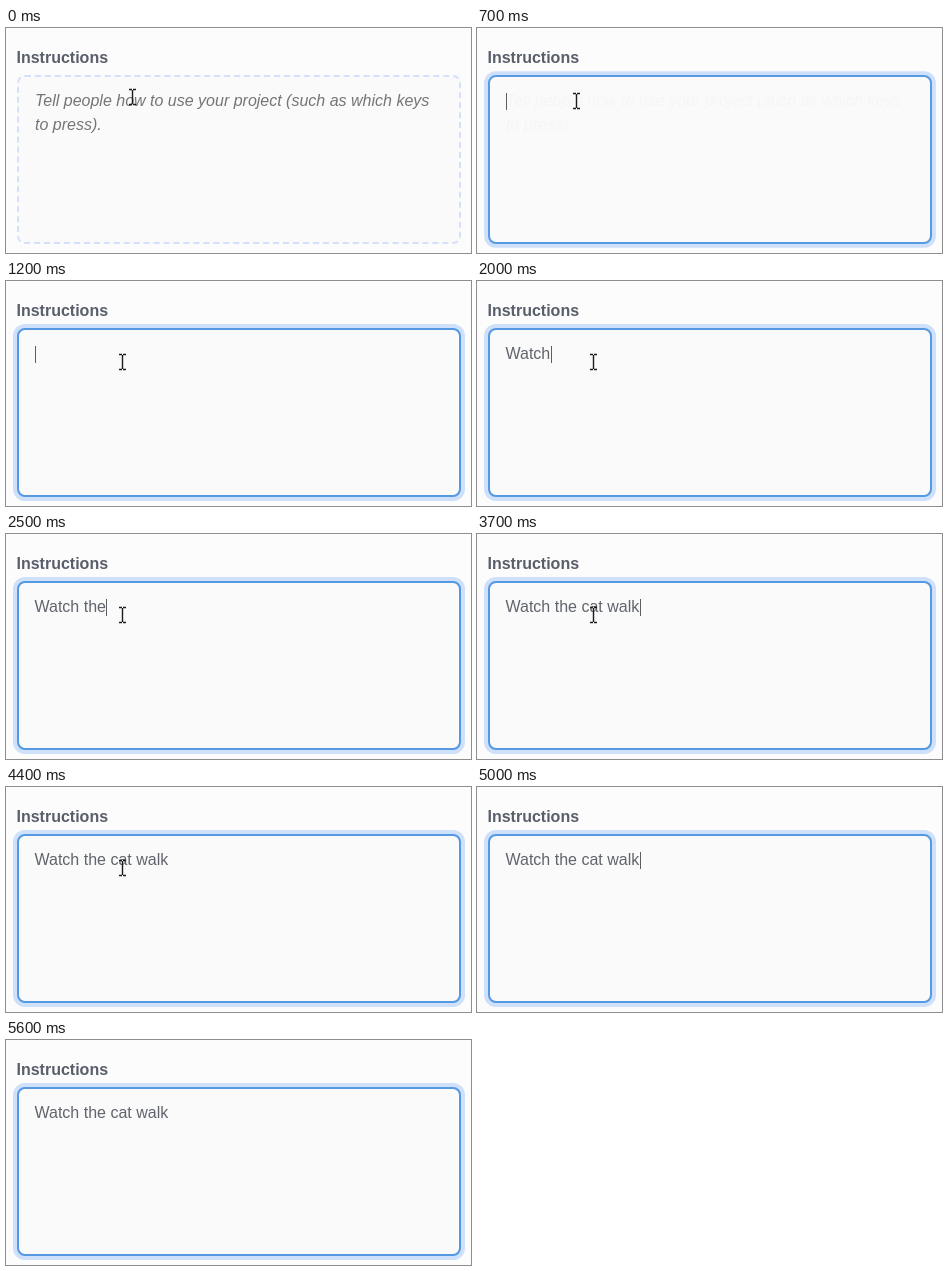
Write an HTML page that moves like this. It is 465x225 px and loops after 5700 ms.

```html
<!DOCTYPE html>
<html lang="en">
<head>
<meta charset="utf-8">
<title>Instructions box</title>
<style>
  html, body { margin: 0; width: 100%; height: 100%; overflow: hidden; background: #fcfcfc; }
  #box {
    position: absolute; left: 11px; top: 47px; width: 444px; height: 169px;
    box-sizing: border-box; border: 2px dashed; border-radius: 8px; background: #fafafa;
  }
  svg { position: absolute; left: 0; top: 0; }
  text { font: 16px "Liberation Sans", Arial, sans-serif; white-space: pre; }
  .label { font-weight: bold; fill: #595e6b; }
  #hint { font-style: italic; fill: #757575; }
  #hint text { font-style: inherit; }
  #typed { fill: #60646c; }
</style>
</head>
<body>
<div id="box"></div>
<svg width="465" height="225" viewBox="0 0 465 225">
  <text class="label" x="10.5" y="35">Instructions</text>
  <g id="hint">
    <text x="29" y="78">Tell people how to use your project (such as which keys</text>
    <text x="29" y="102">to press).</text>
  </g>
  <text id="typed" x="28.5" y="78"></text>
  <rect id="caret" y="65" width="1" height="17" fill="#5c5e63"/>
  <path id="pointer" d="M-3 -7.5H0M1 -7.5H4M.5 -7V7M-3 7.5H0M1 7.5H4" fill="none" stroke="#1c1c1c" stroke-width="1.4"/>
</svg>
<script>
const LOOP = 5700, STEP = 100;
const MESSAGE = 'Watch the cat walk';
const TYPE_AT = 1500, KEY_GAP = 125;
const FOCUS_AT = 700, BLINK = 530;
const IDLE = [213, 224, 251], ACTIVE = [84, 153, 225];

const $ = id => document.getElementById(id);
const box = $('box'), hint = $('hint'), typed = $('typed'), caret = $('caret'), pointer = $('pointer');

// Smooth 0 to 1 between two times
function ease(t, from, to) {
  const k = Math.min(1, Math.max(0, (t - from) / (to - from)));
  return k * k * (3 - 2 * k);
}

function drawBox(t) {
  const focus = ease(t, 450, 730);
  const color = IDLE.map((v, i) => Math.round(v + (ACTIVE[i] - v) * focus));
  box.style.borderStyle = focus ? 'solid' : 'dashed';
  box.style.borderColor = `rgb(${color})`;
  box.style.boxShadow = `0 0 0 ${4 * focus}px #cfe0fa`;
  hint.style.opacity = 1 - focus;
}

function drawText(t) {
  const keys = Math.floor((t - TYPE_AT) / KEY_GAP) + 1;
  const count = Math.min(MESSAGE.length, Math.max(0, keys));
  typed.textContent = MESSAGE.slice(0, count);

  // Each key press restarts the blink
  const since = t - (count ? TYPE_AT + (count - 1) * KEY_GAP : FOCUS_AT);
  const lit = since >= 0 && since % (2 * BLINK) < BLINK;
  caret.style.visibility = lit ? 'visible' : 'hidden';
  caret.setAttribute('x', 29 + Math.round(count ? typed.getComputedTextLength() : 0));
}

function drawPointer(t) {
  const click = ease(t, 0, 500), rest = ease(t, 800, 1100), leave = ease(t, 4500, 4900);
  const x = Math.round(126 - 27 * click + 17 * rest + 8 * leave);
  const y = Math.round(69 + 4 * click + 8 * rest + 160 * leave);
  pointer.setAttribute('transform', `translate(${x} ${y})`);
}

const start = performance.now();
function tick() {
  const elapsed = (performance.now() - start) % LOOP;
  const t = Math.floor(elapsed / STEP) * STEP;
  drawBox(t);
  drawText(t);
  drawPointer(t);
  requestAnimationFrame(tick);
}
tick();
</script>
</body>
</html>
```
